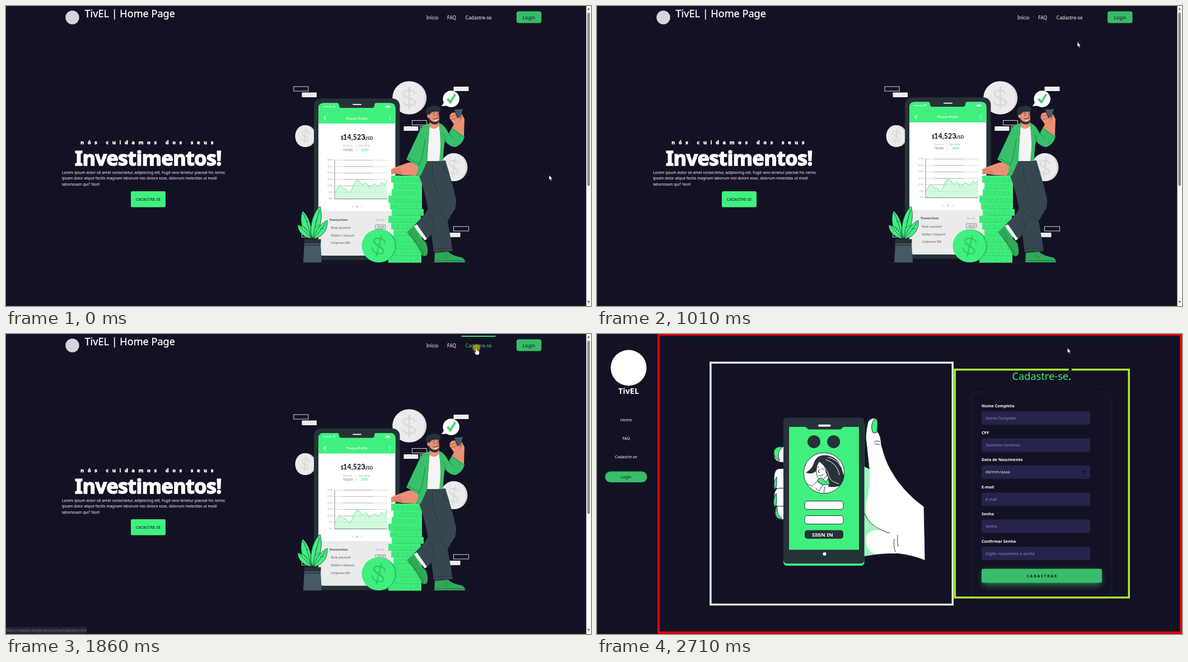
An HTML page for the animation above (2.79 s loop, 1045 by 536 pixels).

```html
<!DOCTYPE html>
<html lang="pt-BR">
<head>
<meta charset="utf-8">
<title>TivEL</title>
<style>
html, body { margin: 0; width: 100%; height: 100%; overflow: hidden; background: #131224; }
svg { display: block; }
text { font-family: "Noto Sans", "Open Sans", sans-serif; white-space: pre; }
.ui text { font-family: Lato, "Open Sans", sans-serif; }
</style>
</head>
<body>
<svg id="stage" xmlns="http://www.w3.org/2000/svg" width="1045" height="536" viewBox="0 0 1045 536"></svg>
<script>
const BG = '#131224', LIME = '#40f07e', GREEN = '#38bd69', DARK = '#263238', PALE = '#ebebeb',
      WHITE = '#fff', SKIN = '#eb9074', CLOTH = '#37474f', JACKET = '#37c069', SHADE = '#9df6be';

const text = (x, y, size, str, fill = WHITE, more = '') =>
  `<text x="${x}" y="${y}" font-size="${size}" fill="${fill}" ${more}>${str}</text>`;
const rect = (x, y, w, h, fill, r = 0, more = '') =>
  `<rect x="${x}" y="${y}" width="${w}" height="${h}" rx="${r}" fill="${fill}" ${more}/>`;
const frame = (x, y, w, h, color, width) =>
  rect(x, y, w, h, 'none', 0, `stroke="${color}" stroke-width="${width}"`);
const path = (d, fill, more = '') => `<path d="${d}" fill="${fill}" ${more}/>`;
const line = (d, color, width = 1, more = '') =>
  path(d, 'none', `stroke="${color}" stroke-width="${width}" stroke-linecap="round" stroke-linejoin="round" ${more}`);
const oval = (x, y, rx, ry, fill, more = '') =>
  `<ellipse cx="${x}" cy="${y}" rx="${rx}" ry="${ry}" fill="${fill}" ${more}/>`;
const group = (body, more = '') => `<g ${more}>${body}</g>`;
const heavy = w => `stroke="${WHITE}" stroke-width="${w}"`;
const MID = 'text-anchor="middle"', BOLD = 'font-weight="700"';

function coin(x, y, rx, ry, fill, edge, tilt = 0) {
  const s = ry / 25;
  return oval(x + 1, y, rx, ry, edge) + oval(x - 1, y, rx - 1, ry, fill) +
    group(line('M8-7C6-13-9-13-9-6S9 0 9 7-7 13-9 6M0-16V16', edge, 2),
      `transform="translate(${x} ${y}) rotate(${tilt}) scale(${s})"`);
}

function stack() {
  const left = [688, 692, 689, 683, 686, 689, 683, 688, 692, 688, 683, 686, 683];
  const wide = [56, 51, 54, 60, 57, 57, 58, 56, 52, 55, 59, 56, 59];
  return left.map((x, i) => {
    const y = 303 + i * 11.95;
    return rect(x, y, wide[i], 12, LIME, 1) +
      `<path d="M${x + 3} ${y + 7}h${wide[i] - 6}" stroke="#35d06d" stroke-width="7.5" stroke-dasharray=".8 2.1 .8 3 .8 1.6"/>` +
      line(`M${x} ${y + 12}h${wide[i]}`, '#2fb860', .7);
  }).join('');
}

function financePhone() {
  let s = rect(550, 165.3, 153.5, 288.5, DARK, 13) + rect(558, 173.5, 137.5, 272.5, WHITE, 9) +
    path('M558 210V182Q558 173.5 567 173.5H687Q695.5 173.5 695.5 182V210Z', LIME) +
    path('M592 173H661Q658 174 658 178Q658 182 654 182H599Q595 182 595 178Q595 174 592 173Z', DARK) +
    line('M620 175.8H634', WHITE, 1.8) + line('M571 197.5L568 200.5L571 203.5', WHITE, 1.3);
  for (let i = 0; i < 5; i++) s += oval(568 + i * 3, 180, 1, 1, WHITE);
  for (let i = 0; i < 3; i++) s += oval(685.5, 198 + i * 2.4, .8, .8, WHITE);
  s += line('M584 179Q586 177.3 588 179M585 180.5Q586 179.6 587 180.5', WHITE, .9) + rect(678, 178.3, 8, 3.4, WHITE, 1) +
    text(626.5, 202.6, 5.2, 'Finance Profile', WHITE, `${MID} ${BOLD} letter-spacing=".25"`) +
    text(598, 239, 8.5, '$', '#111', BOLD) + text(602.3, 239, 12.3, '14,523', '#111', `${BOLD} letter-spacing=".1"`) +
    text(640, 239, 7.2, 'USD', '#111', `${BOLD} letter-spacing=".3"`) +
    text(603, 251.5, 5, 'Income', '#b5b5b5') + text(629, 251.5, 5, 'Spending', '#b5b5b5') +
    text(602, 258.6, 5, '+$1200', '#666') + text(633.5, 258.6, 5, '-$590', LIME, BOLD) +
    line('M625 247V260', '#ddd', .7);
  for (let i = 0; i < 7; i++) {
    const y = 275.5 + i * 11.5;
    s += text(583, y + 1, 4, i < 6 ? `$${30 - i * 5}k` : '$0k', '#aaa', 'text-anchor="end"') +
      line(`M587 ${y}H681`, i < 6 ? '#d0d0d0' : '#999', .8) +
      (i < 6 ? line(`M603 ${y}H655`, '#999', .6) : '');
  }
  const curve = 'M588 333C592 326 594 321 597 321S603 328 606 327S611 333 613 333C619 332 622 311 628 311.5S634 321 637 320' +
    'S641 314 645 318S648 327 650 326S656 317 659 318S664 324 667 321S671 312 674 317S678 316 681 312';
  s += path(curve + 'V344.5H588Z', '#c9f7d9', 'opacity=".8"') + line(curve, '#4be585', .9) +
    line('M587 275V344.7H681', '#78868c', .9);
  [618.5, 627, 635.5].forEach((x, i) => s += oval(x, 358.5, i == 1 ? 2 : 1.2, i == 1 ? 2 : 1.2, '#d4d4d4'));
  return s + path('M558 366.5H695.5V437Q695.5 446 687 446H567Q558 446 558 437Z', PALE) +
    text(578, 383.6, 5.3, 'Transactions', DARK, `${BOLD} letter-spacing=".25"`) + text(660, 383.6, 5.2, 'See all', '#aaa') +
    text(580.5, 398, 5.3, 'Bank payment', '#555', 'letter-spacing=".2"') + text(580.5, 411.7, 5.3, 'Walter\'s Deposit', '#555', 'letter-spacing=".2"') +
    text(580.5, 425.4, 5.3, 'Cellphone Bill', '#555', 'letter-spacing=".2"') +
    frame(660, 391, 17.5, 7.5, '#777', .8) + text(668.8, 396.8, 5, '-$129', '#555', MID);
}

function plant() {
  const leaf = (d, vein) => path(d, LIME, `stroke="${BG}" stroke-width=".7"`) + line(vein, DARK, .8);
  return leaf('M546 416C526 405 524 378 530 366C543 378 547 398 546 416Z', 'M546 416Q540 390 531 370') +
    leaf('M547 416C540 395 549 368 561 358C567 378 561 402 547 416Z', 'M547 416Q553 390 560 364') +
    leaf('M545 416C531 413 521 403 521 391C535 394 543 404 545 416Z', 'M545 416Q534 402 524 394') +
    leaf('M549 416C553 400 563 388 574 383C575 400 566 413 549 416Z', 'M549 416Q562 402 571 388') +
    line('M535 384L540 386M533 394L538 401M552 386L556 382M551 396L559 391M562 398L568 398', DARK, .6) +
    path('M533 424H562L564 458H531Z', '#455a64') + rect(532.5, 416.5, 30, 7.5, DARK, .5) + line('M534 427H561', DARK, 1.5);
}

function man() {
  return path('M744 290L754 345Q757 362 747 373L729 392Q739 407 752 417L803 362L788 300Z', CLOTH) +
    path('M729 393L734 390L752 416L748 419Z', '#f1f1f1') +
    path('M716 404L728 393Q738 411 751 424Q755 437 752 445Q748 449 743 445Q731 421 716 404Z', '#2fa958') +
    line('M719 407Q736 423 747 446', '#1f6f3b', .8) +
    path('M741 276H785C792 300 800 325 804 346Q805 358 799 367L789 384Q794 412 798 438L764 440Q759 402 756 374Q750 335 738 303L737 284Z', CLOTH) +
    line('M762 284Q761 310 772 335M781 285Q783 294 788 298M788 384Q779 375 775 366M757 374Q766 385 765 398M770 360Q764 366 757 374M765 434L797 432', DARK, .9) +
    path('M766 441L790 439Q796 446 813 449Q820 451 820 458H765Z', '#2fa958') + line('M766 455H819M788 443L781 449M793 445L787 451', '#1f6f3b', .9) +
    path('M735 278L718 280L693 289Q686 292 688 296L688 301L697 300L709 302L733 303L738 289Z', SKIN) +
    line('M690 294L704 291M691 298L706 295M697 300L709 298', '#9c4a3a', .7) +
    path('M757 208L752 277H775Q778 245 774 212Z', '#f4f4f4') +
    path('M757 200L756 215Q765 224 774 214L773 202Z', SKIN) +
    path('M753 210Q743 212 738 225L715 274L736 286L734 303H741L753 276Q754 240 757 211Z', JACKET) +
    line('M737 286L743 272L749 238M717 271L737 282', '#1f7d43', .9) +
    path('M773 209Q783 211 791 228L797 216L819 232Q817 246 803 252Q794 253 784 241Q781 260 781 277H774Q778 246 774 216Z', JACKET) +
    line('M782 229Q785 234 785 242M791 228L801 237M797 219L817 234', '#1f7d43', .9) +
    path('M797 218L800 211L793 201Q791 196 796 191L803 190L815 194L819 202L818 232Z', SKIN) +
    path('M800 185L816 184L812 199L806 200Z', '#455a64') + line('M801 185L807 200', DARK, 1.2) +
    line('M794 198L803 195M796 203L807 200M815 195L810 206', '#9c4a3a', .8) +
    path('M754 186Q763 182 773 186L774 203Q772 211 765 211Q757 211 755 202Z', SKIN) +
    path('M753 192L756 194L757 202Q761 208 767 207Q772 206 773 203Q774 211 766 211.5Q757 211 754 203Z', DARK) +
    path('M750 190Q750 180 760 179Q769 176 776 183Q777 189 770 189Q762 188 758 192L756 198L752 196Z', DARK) +
    oval(755, 197, 2.5, 3.2, SKIN) + line('M763 192L766 191M770 191L773 192M763 201.5Q767 203 772 200.5', DARK, 1) +
    line('M765 204Q768 206 771 203', WHITE, 1.1) + line('M769 194L772 199L769 200', '#9c4a3a', .8) +
    oval(765, 195, .8, 1, DARK) + oval(772, 194.5, .7, 1, DARK);
}

function home() {
  const outline = (x, y, w) => frame(x, y, w, 8, PALE, .9);
  const nav = (x, str, more) => text(x, 23.5, 8.45, str, WHITE, more);
  return rect(0, 0, 1045, 536, BG) + rect(0, 535, 1037, 1, '#3a1c33') +
    oval(118.5, 20.5, 12.2, 12.2, '#d5d5da') +
    text(140.5, 19.6, 18.1, 'TivEL | Home Page', WHITE, heavy(.3)) +
    nav(750.7, 'Início') + nav(788, 'FAQ') + nav(820.8, 'Cadastre-se', 'id="link"') +
    rect(813.5, 3, 61, 2, '#3be27a', 0, 'id="bar"') +
    rect(912, 9.5, 44.5, 21, '#37bc68', 4) + text(934.2, 23.7, 8.5, 'Login', BG, MID) +
    text(133.3, 246.8, 9, 'nós cuidamos dos seus', WHITE, `${BOLD} letter-spacing="6.75" ${heavy(.6)}`) +
    text(254, 284.5, 36, 'Investimentos!', WHITE, `${MID} ${BOLD} letter-spacing="-.6" ${heavy(1.6)}`) +
    ['Lorem ipsum dolor sit amet consectetur, adipisicing elit. Fugit vero tenetur placeat hic nemo',
      'ipsam dolor atque facilis magnam laborum nisi dolore esse, dolorum molestias ut modi',
      'laboriosam qui? Non!'].map((s, i) => text(100, 299.6 + i * 10.8, 6.76, s)).join('') +
    rect(223, 331, 62, 28.5, LIME, 2.5) + text(254, 348.3, 7, 'CADASTRE-SE', BG, MID) +
    outline(514, 144, 26) + rect(528.5, 154.5, 26.5, 8.5, PALE) + rect(799.5, 144, 27, 8, PALE) +
    outline(725.5, 204.5, 26) + rect(710.5, 215, 26, 8, PALE) + outline(740, 215, 26) +
    outline(799.5, 394, 27) + rect(785, 405, 26.5, 8, PALE) + outline(528.5, 405, 26) +
    coin(720.3, 164, 30, 29.5, PALE, '#d6d6d6') + coin(534.5, 232.5, 18, 19.5, PALE, '#d6d6d6', 8) +
    coin(800, 288, 23.5, 25, PALE, '#d6d6d6', 8) +
    line('M513 458.5H827', '#23222f', .6) +
    group(financePhone(), 'id="phone" class="ui"') + plant() + stack() +
    coin(666, 428.5, 30.5, 29.5, LIME, '#2fc766', 14) + man() +
    path('M778 179L783 171L791 178Z', WHITE) + oval(795.2, 166, 14.7, 14.7, WHITE) +
    path('M787 167L790.5 164.5L793.5 169L801 156.5L804 158.5L794 175Z', '#38d873') +
    rect(1036.5, 0, 9, 536, '#fafafa') + rect(1038.3, 12, 4.8, 309.5, '#8c8c8c', 2.4) +
    path('M1038 7L1040.7 3L1043.4 7Z', '#777') + path('M1038 527L1040.7 531L1043.4 527Z', '#777') +
    group(rect(-2, 523.5, 146, 14, '#252433', 2) + text(0, 532.4, 6.5, 'https://talvora.site/pi-senac/view/cadastro.html', '#777681'), 'id="status"');
}

function loginHand() {
  const ink = `stroke="${DARK}" stroke-width="1"`;
  const finger = (y, h, x) => path(`M334 ${y}H326Q${x} ${y} ${x} ${y + h / 2}Q${x} ${y + h} 334 ${y + h}Z`, WHITE, ink);
  const avatar = oval(405.5, 243, 36.5, 36.5, WHITE) +
    path('M387 226Q392 210 408 211Q432 213 438 238L446 262Q424 270 413 267Q416 253 409 243Q407 229 397 223Q391 232 393 238Q384 247 373 242Q384 236 387 226Z', DARK) +
    path('M392 235Q390 249 399 255Q407 255 411 246', WHITE, ink) +
    path('M393 256L400 251L409 259L413 253L416 263L403 264Z', LIME, ink) +
    line('M397 223Q410 232 415 250Q418 259 432 262M409 219Q430 226 433 246M413 215Q429 218 436 232', WHITE, 1) +
    line('M393 233L397 232M401 235L405 236M397 236L395 241L398 242M396 247Q401 250 405 245', DARK, 1) +
    line('M384 266L393 258L403 264L397 275L391 270M407 267L405 280M374 262L384 266', DARK, .9);
  return finger(196, 28, 316) + path('M326 196Q315 198 316 208Q318 218 326 221Q320 206 331 197Z', LIME, ink) +
    finger(235, 40, 316) + path('M321 250Q314 258 317 272Q322 270 321 250Z', LIME, ink) +
    finger(270, 36, 316) + path('M320 279Q313 290 317 304Q323 299 320 279Z', LIME, ink) +
    finger(302, 24, 318) + path('M322 305Q315 314 322 323Q331 327 330 323Q321 318 322 305Z', LIME, ink) +
    path('M477 232L486 235Q483 205 480 180Q481 164 484 152Q488 144 498 145Q503 153 501 169Q507 176 508 193Q515 220 524 236Q546 276 584 303L586 399Q564 390 539 387Q509 386 477 392Z', WHITE, ink) +
    path('M477 231L486 236Q490 265 482 292Q477 310 485 327Q495 342 509 346Q488 342 482 354Q476 378 496 388L477 391Z', SHADE) +
    path('M492 170Q488 156 495 147Q502 142 501 158L500 170Q496 173 492 170Z', LIME, ink) +
    line('M477 314Q486 336 511 346Q519 350 523 350M495 187Q500 184 506 187M496 191L505 192M531 361Q529 374 533 384M537 354Q536 366 538 374M480 179Q483 207 486 236', DARK, 1) +
    rect(333, 150, 144.5, 258.5, LIME, 6) + rect(333, 144, 144.5, 260.5, DARK, 6) + rect(343, 160.5, 125, 219.5, LIME) +
    path('M372 160H441L435 165H378Z', DARK) + rect(395, 156.2, 22.5, 3.8, WHITE, 1.9) + oval(406.5, 387.6, 3, 3, WHITE) +
    oval(387.5, 187, 11.5, 11.5, DARK) + oval(422.7, 187, 11.5, 11.5, DARK) +
    group(avatar, 'clip-path="url(#face)"') + oval(405.5, 243, 36.3, 36.3, 'none', ink) +
    rect(371, 293, 69, 15, WHITE, 5, ink) + rect(371, 319, 69, 15, WHITE, 5, ink) + rect(371, 345, 69, 15.2, DARK, 5) +
    text(403, 356.2, 9.6, 'SIGN IN', WHITE, `${MID} ${BOLD}`);
}

function signup() {
  const fields = [['Nome Completo'], ['CPF', 'Somente números'], ['Data de Nascimento', 'dd/mm/aaaa'],
    ['E-mail'], ['Senha'], ['Confirmar Senha', 'Digite novamente a senha']];
  const form = fields.map(([label, hint = label], i) => {
    const y = 138 + i * 48.4;
    return text(687, y - 7.4, 7.25, label, WHITE, BOLD) + rect(687, y, 194, 24, '#25234a', 3.5) +
      text(694, y + 14.5, 7.15, hint, i == 2 ? '#e8e8ee' : '#9291ab');
  }).join('');
  return rect(0, 0, 1045, 536, BG) + rect(0, 535, 1045, 1, '#3a1c33') +
    oval(56.5, 60.5, 32, 32, WHITE) + text(56.5, 106.5, 14.4, 'TivEL', WHITE, `${MID} ${BOLD}`) +
    ['Home', 'FAQ', 'Cadastre-se'].map((s, i) => text(52, 155.7 + i * 33, 7.2, s, WHITE, MID)).join('') +
    rect(14.5, 245.5, 75, 19.5, GREEN, 9.7) + text(52, 257.8, 7.2, 'Login', BG, MID) +
    frame(110, .8, 933.3, 532.7, '#f00', 3.8) + frame(202.9, 51.2, 432.4, 432.2, '#dcf4e3', 3.5) +
    rect(671, 106, 246, 364, '#1d1c30', 9, 'filter="url(#blur)"') + rect(671, 106, 246, 364, BG, 9) +
    frame(639.2, 63.6, 311, 407.2, '#acf72d', 3.4) + rect(842.5, 62, 5.5, 3.5, BG) +
    text(741.5, 82.2, 18.2, `Cadastre-se<tspan fill="#fff">.</tspan>`, '#40ec7c') + form +
    frame(866.8, 244, 5.2, 5.2, '#111', .9) + line('M866.8 245.5H872', '#111', 1) +
    rect(689, 424, 211, 25, GREEN, 6, 'filter="url(#blur)" opacity=".6"') + rect(687, 419.5, 215, 25, GREEN, 3) +
    text(795.3, 434.5, 6.7, 'CADASTRAR', BG, `${MID} ${BOLD} letter-spacing="1.8"`) +
    group(loginHand(), 'id="hand"');
}

const pointer =
  group(path('M0 0V9L2 7.2L3.6 10.4L5 9.7L3.6 6.8H6.2Z', WHITE, 'stroke="#111" stroke-width=".6"'), 'id="arrow"') +
  group(path('M-1.2 1Q0-.8 1.2 1V5L4.4 5.6Q5.6 6 5.4 8L4.4 12.5H-.8L-3.6 8Q-3.4 6.4-1.2 8Z', WHITE, 'stroke="#111" stroke-width=".5"'), 'id="finger"');

const stage = document.getElementById('stage');
stage.innerHTML = `<defs><clipPath id="face">${oval(405.5, 243, 36.3, 36.3, WHITE)}</clipPath>
  <filter id="blur" x="-20%" y="-60%" width="140%" height="220%"><feGaussianBlur stdDeviation="6"/></filter></defs>` +
  group(home(), 'id="home"') + group(signup(), 'id="signup"') +
  oval(840.3, 25, 6.7, 6.7, '#d8c400', 'id="click" opacity=".65"') + group(pointer, 'id="cursor"');

const LOOP = 2790, STEP = 77.5;
const $ = id => document.getElementById(id);
const show = (id, on) => $(id).style.display = on ? '' : 'none';
const move = (id, x, y) => $(id).setAttribute('transform', `translate(${x} ${y})`);

// time, x, y of the pointer tip
const route = [[0, 970, 302], [540, 876, 98], [700, 865.5, 77], [1010, 858, 64], [1090, 856, 61],
  [1400, 843, 35], [1550, 841, 29.5], [1860, 840.3, 24.8], [LOOP, 840.3, 24.8]];

function along(t) {
  const i = Math.max(1, route.findIndex(p => p[0] >= t));
  const [a, b] = [route[i - 1], route[i]], u = (t - a[0]) / (b[0] - a[0]);
  return [a[1] + (b[1] - a[1]) * u, a[2] + (b[2] - a[2]) * u];
}

function draw() {
  const k = Math.min(35, Math.floor((performance.now() % LOOP + 11) / STEP));
  const t = k * STEP, onForm = k >= 29, hover = t >= 1310 && !onForm;
  const d = ((t - 396 + 1500) % 1500) / 1500;
  show('home', !onForm);
  show('signup', onForm);
  move('phone', 0, .2 + 3.64 * (1 - 4 * Math.min(d, 1 - d)));
  move('hand', 0, (t - 29 * STEP) * .0118);
  move('cursor', ...along(t));
  show('finger', hover);
  show('arrow', !hover);
  show('bar', hover);
  $('link').setAttribute('fill', hover ? '#3be27a' : WHITE);
  show('click', k >= 23 && k <= 25);
  show('status', k >= 23 && k <= 27);
  requestAnimationFrame(draw);
}
draw();
</script>
</body>
</html>
```
